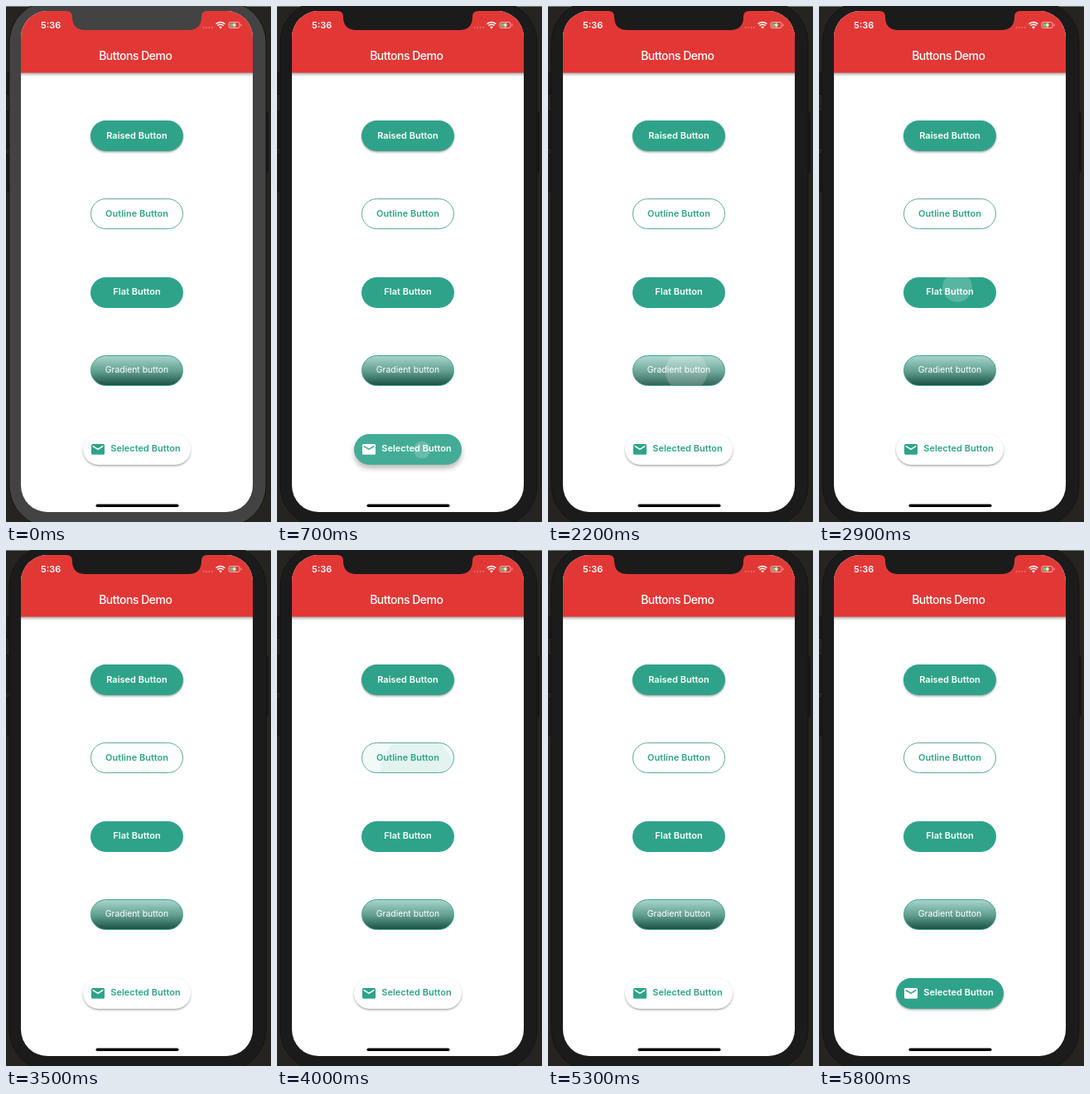
Recreate the animation shown at these times as an HTML page. Size 320 by 622 pixels, loop 5.9 s.

```html
<!DOCTYPE html>
<html lang="en">
<head>
<meta charset="utf-8">
<title>Buttons Demo</title>
<style>
  :root { --loop: 5.9s; --teal: #2fa38a; --red: #e13836; }
  html, body { margin: 0; width: 100%; height: 100%; overflow: hidden; background: #252420; }
  body { font-family: Inter, Roboto, sans-serif; }
  .stage { position: absolute; left: 0; top: 0; width: 320px; height: 622px; overflow: hidden; }
  .stage > svg { position: absolute; left: 0; top: 0; }

  .body { animation: body var(--loop) step-end infinite; }
  @keyframes body { 0% { fill: #434343; } 1.69%, 100% { fill: #1b1b1b; } }

  .title { font-size: 14px; font-weight: 500; letter-spacing: -.5px; }
  .clock { font-size: 11px; font-weight: 600; }

  .btn {
    position: absolute; left: 102px; top: var(--y); width: 112px; height: 37px;
    box-sizing: border-box; border-radius: 19px; overflow: hidden;
    display: flex; align-items: center; justify-content: center;
    font-size: 11px; font-weight: 600; color: #fff; background: var(--teal);
    --wave: #fff3; --glow: #fff;
  }
  .btn span, .btn svg { position: relative; z-index: 1; white-space: nowrap; }
  .btn span { top: -.9px; }
  .btn::before, .btn::after {
    content: ""; position: absolute; opacity: 0;
    animation: var(--loop) linear calc(var(--t) - var(--loop)) infinite;
  }
  .btn::before { inset: 0; background: var(--glow); animation-name: glow; }
  .btn::after {
    left: calc(var(--px) - 44px); top: calc(var(--py) - 44px);
    width: 88px; height: 88px; border-radius: 50%;
    background: var(--wave); animation-name: ripple;
  }
  @keyframes ripple {
    0% { transform: scale(.1); opacity: 0; }
    1%, 5% { opacity: 1; }
    8% { transform: scale(1); }
    11%, 100% { transform: scale(1); opacity: 0; }
  }
  @keyframes glow { 0%, 11%, 100% { opacity: 0; } 1.2%, 7% { opacity: .1; } }

  .raised { animation: lift var(--loop) linear calc(var(--t) - var(--loop)) infinite; }
  @keyframes lift {
    0%, 14%, 100% { box-shadow: 0 1.5px 2.5px #0005; }
    1.5%, 9% { box-shadow: 0 5px 8px #0004; }
  }
  .outline {
    background: #fff; color: var(--teal); border: 1px solid #5fa899;
    --wave: #2fa38a33; --glow: var(--teal);
  }
  .flat { --glow: transparent; }
  .gradient {
    border: 1px solid #43a08c; font-size: 10.4px; font-weight: 400;
    background: linear-gradient(#aad7ce, #629f91 52%, #174f42) border-box;
  }
  .selected {
    left: 93px; width: 130px; gap: 7px; padding-right: 2px;
    animation: lift var(--loop) linear calc(var(--t) - var(--loop)) infinite,
               toggle var(--loop) step-end infinite;
  }
  @keyframes toggle {
    0%, 17% { background: #fff; color: var(--teal); }
    5.1%, 91.5%, 100% { background: var(--teal); color: #fff; }
  }
</style>
</head>
<body>
<div class="stage">
  <svg width="320" height="622" viewBox="0 0 320 622">
    <defs>
      <clipPath id="screen"><rect x="18" y="6" width="280" height="604" rx="32"/></clipPath>
      <linearGradient id="shade" x2="0" y2="1">
        <stop stop-color="#000" stop-opacity=".34"/>
        <stop offset="1" stop-color="#000" stop-opacity="0"/>
      </linearGradient>
    </defs>
    <rect width="320" height="622" fill="#252420"/>
    <rect width="320" height="1" fill="#777"/>
    <g fill="#1c1b19" stroke="#11110f">
      <rect x="-2" y="81" width="7" height="25" rx="2"/>
      <rect x="-2" y="127" width="7" height="44" rx="2"/>
      <rect x="-2" y="179" width="7" height="44" rx="2"/>
      <rect x="311" y="128" width="5" height="73" rx="2"/>
    </g>
    <rect class="body" x="4" y="-6" width="310" height="634" rx="50" stroke="#151513"/>
    <g clip-path="url(#screen)">
      <rect x="18" y="6" width="280" height="604" fill="#fff"/>
      <rect x="18" y="80" width="280" height="5" fill="url(#shade)"/>
      <rect x="18" y="6" width="280" height="74.5" fill="var(--red)"/>
    </g>
    <path class="body" d="M73 5V6Q80 6 80 13Q80 29 96 29H220Q236 29 236 13Q236 6 243 6V5Z"/>
    <g fill="#fff">
      <text class="title" x="156.3" y="65" text-anchor="middle">Buttons Demo</text>
      <text class="clock" x="42" y="27">5:36</text>
      <g opacity=".45">
        <circle cx="238.5" cy="26" r=".8"/><circle cx="242" cy="26" r=".8"/>
        <circle cx="245.5" cy="26" r=".8"/><circle cx="249" cy="26" r=".8"/>
      </g>
      <path d="M259 27.5L257 25.2Q259 23.6 261 25.2Z"/>
    </g>
    <g fill="none" stroke="#fff" stroke-width="1.5">
      <path d="M253.6 21.6Q259 17.2 264.4 21.6M255.4 23.6Q259 20.8 262.6 23.6"/>
      <rect x="269" y="19.5" width="13" height="7" rx="2" stroke-width="1" stroke-opacity=".6"/>
      <path d="M284 21.7V24.3" stroke-width="1" stroke-opacity=".6"/>
    </g>
    <rect x="270.3" y="20.8" width="7.5" height="4.4" rx="1" fill="#76bd74"/>
    <path d="M276.6 19.4L273.6 23.5H275.6L274.8 26.6L278 22.4H276Z" fill="#fff"/>
    <rect x="108.5" y="600.6" width="100" height="3.4" rx="1.7" fill="#050505"/>
  </svg>

  <div class="btn raised" style="--y:138px; --t:4.42s; --px:62px; --py:20px"><span>Raised Button</span></div>
  <div class="btn outline" style="--y:232px; --t:3.49s; --px:66px; --py:34px"><span>Outline Button</span></div>
  <div class="btn flat" style="--y:326.5px; --t:2.74s; --px:65px; --py:12px"><span>Flat Button</span></div>
  <div class="btn gradient" style="--y:421px; --t:1.95s; --px:64px; --py:18px"><span>Gradient button</span></div>
  <div class="btn selected" style="--y:515.7px; --t:.63s; --px:82px; --py:19px">
    <svg width="16" height="12.8" viewBox="2 4 20 16" fill="currentColor">
      <path d="M20 4H4Q2 4 2 6V18Q2 20 4 20H20Q22 20 22 18V6Q22 4 20 4ZM20 8L12 13L4 8V6L12 11L20 6Z"/>
    </svg>
    <span>Selected Button</span>
  </div>
</div>
</body>
</html>
```
